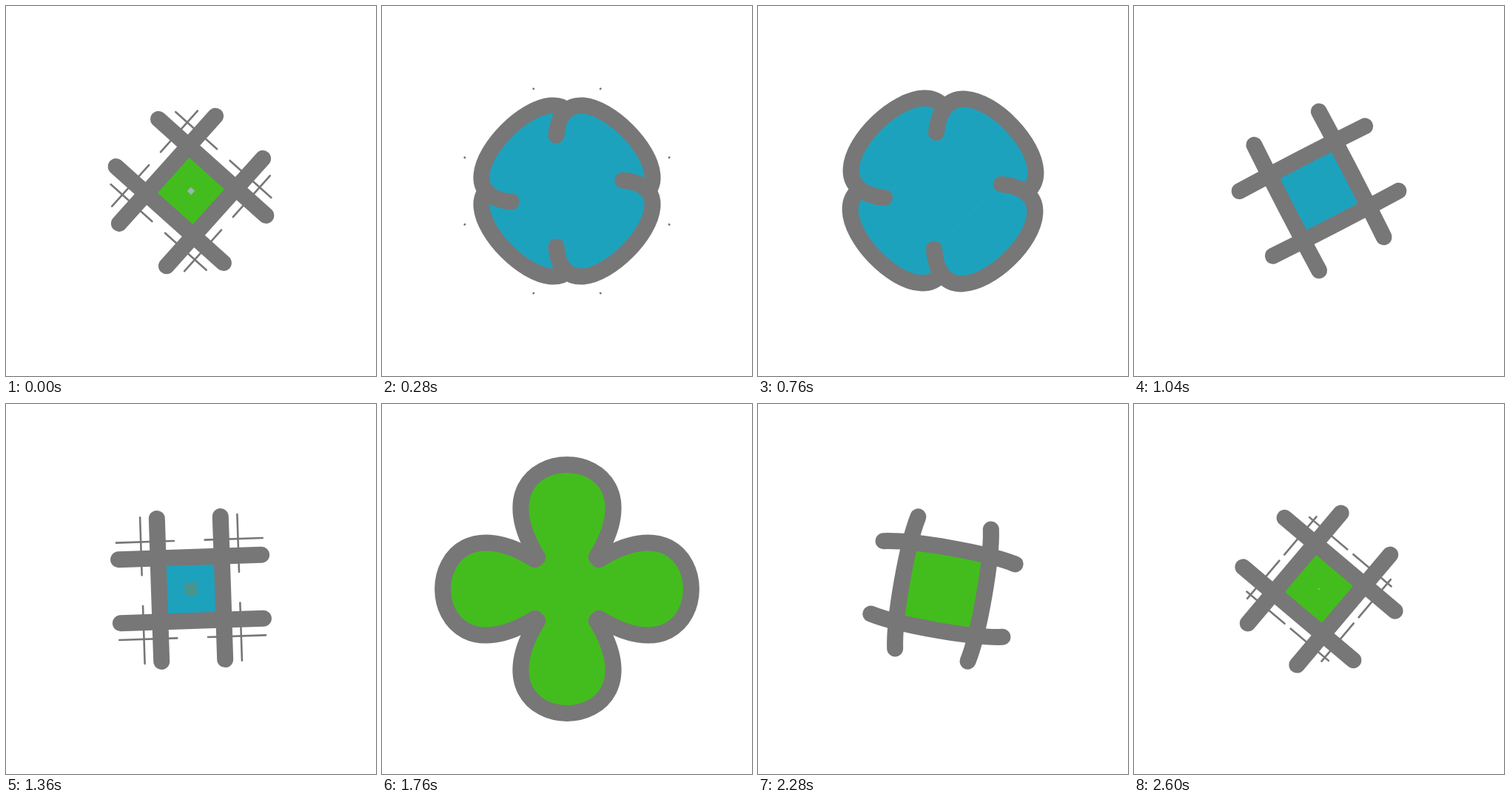
Animation of 500 by 500 pixels, one loop 2.64 s. Source, as an HTML page with a canvas:

```html
<!DOCTYPE html>
<html>
<head>
<meta charset="utf-8">
<style>
  html, body { margin: 0; width: 100%; height: 100%; overflow: hidden; background: #fff; }
  canvas { display: block; }
</style>
</head>
<body>
<canvas id="stage" width="500" height="500"></canvas>
<script>
const ctx = document.getElementById('stage').getContext('2d');
const HALF = 1320, LEAD = 200;
const GRAY = '#777777';
const FILLS = [[29, 162, 190], [67, 189, 30]];
const SEEDS = [[184, 180, 176], [76, 132, 186]];

const span = (t, start, length) => Math.min(1, Math.max(0, (t - start) / length));
const cubic = u => u < .5 ? 4 * u ** 3 : 1 - 4 * (1 - u) ** 3;
const quad = u => u < .5 ? 2 * u * u : 1 - 2 * (1 - u) ** 2;
const sine = u => (1 - Math.cos(Math.PI * u)) / 2;
const smooth = u => u * u * (3 - 2 * u);
const rgb = c => `rgb(${c.map(Math.round)})`;
const mix = (a, b, u) => a.map((v, i) => v + (b[i] - v) * u);

function square(half, color) {
  ctx.fillStyle = color;
  ctx.fillRect(-half, -half, 2 * half, 2 * half);
}

// How far the bars are bent into petals, 0 to 1
function openness(p) {
  if (p < 530) return sine(span(p, 0, 530));
  const u = span(p, 530, 650);
  return (1 - u) ** 3 * (1 + 3 * u);
}

function petal(open, push, color) {
  const x = 97.5 - 62 * open, y = -43 - push, swell = 3 * push * open;
  const cx = 33 + 110 * smooth(Math.min(1, 2 * open)) + swell;
  const cy = y - 168.8 * smooth(open) - swell;
  ctx.beginPath();
  ctx.moveTo(-x, y);
  ctx.bezierCurveTo(-cx, cy, cx, cy, x, y);
  ctx.fillStyle = color;
  ctx.fill();
  ctx.lineWidth = 22;
  ctx.stroke();
}

function sparks(p) {
  const head = 130 * (1 - (1 - span(p, -190, 452)) ** 2);
  const tail = 130 * span(p, -120, 402) ** 2;
  if (head - tail < .05) return;
  ctx.beginPath();
  for (const side of [-1, 1]) {
    ctx.moveTo(side * tail, -65.7);
    ctx.lineTo(side * head, -65.7);
  }
  ctx.lineWidth = 2.6;
  ctx.stroke();
}

function draw(time) {
  const t = time % (2 * HALF) + LEAD;
  const turn = Math.floor(t / HALF), p = t % HALF - LEAD;
  const now = turn % 2;
  const fill = rgb(FILLS[now]);
  const angle = 45 * (turn + cubic(span(p, -740, 1000)) + cubic(span(p, 580, 1000)));
  const open = openness(p);
  const push = 7 * Math.sin(Math.PI * span(p < 0 ? p + HALF : p, 560, 740));
  const grow = quad(span(p, -75, 370));

  ctx.setTransform(1, 0, 0, 1, 0, 0);
  ctx.fillStyle = '#fff';
  ctx.fillRect(0, 0, 500, 500);
  ctx.translate(250, 250);
  ctx.rotate(angle * Math.PI / 180);
  ctx.strokeStyle = GRAY;
  ctx.lineCap = 'round';

  const core = 43.5 + push;
  if (grow < 1) square(core, rgb(FILLS[1 - now]));
  square(core * grow, rgb(mix(SEEDS[now], FILLS[now], span(p, -40, 280))));

  // Later petals overlap earlier ones, so the order must stay aligned with the stage
  ctx.rotate(Math.PI - turn * Math.PI / 4 + (turn % 2) * Math.PI / 4);
  for (let i = 0; i < 4; i++) {
    petal(open, push, fill);
    sparks(p);
    ctx.rotate(Math.PI / 2);
  }
}

function frame() {
  draw(performance.now());
  requestAnimationFrame(frame);
}
frame();
</script>
</body>
</html>
```
